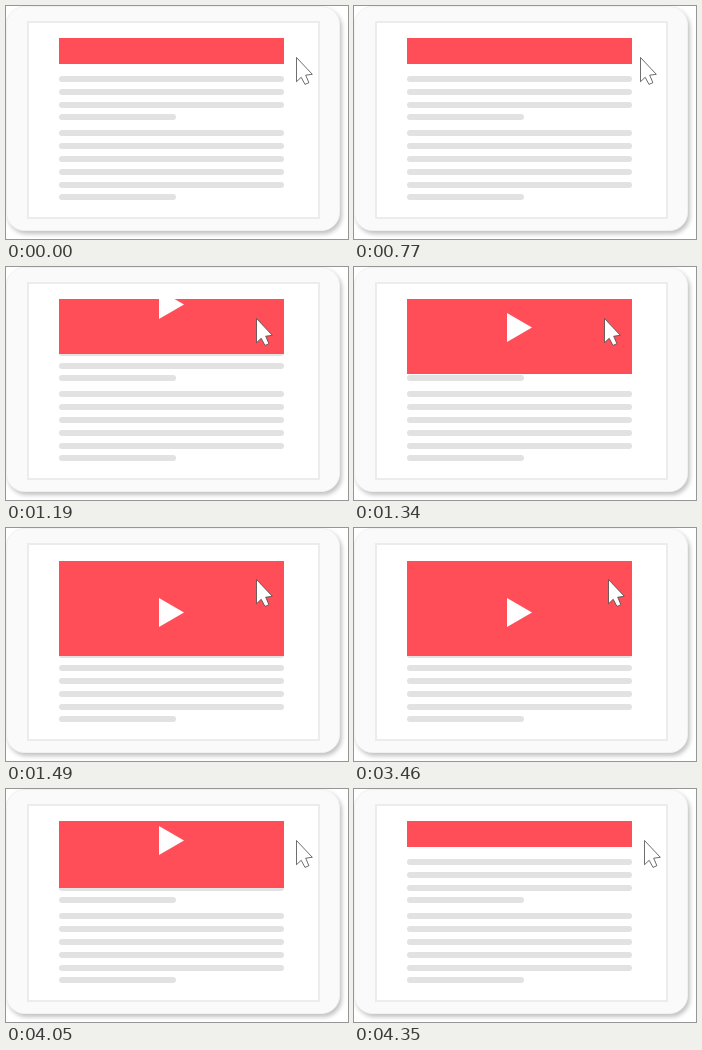
Recreate the animation shown at these times as an HTML page. Size 342x233 px, loop 4.85 s.

```html
<!DOCTYPE html>
<html lang="en">
<head>
<meta charset="utf-8">
<title>Expanding video banner</title>
<style>
  html, body { margin: 0; width: 100%; height: 100%; overflow: hidden; background: #fff; }
  svg { display: block; }
  #device { filter: drop-shadow(2px 3px 2px rgba(0, 0, 0, .24)); }
</style>
</head>
<body>
<svg width="342" height="233" viewBox="0 0 342 233">
  <clipPath id="page"><rect x="53" y="32" width="225" height="170"/></clipPath>
  <rect id="device" x=".5" y=".5" width="333" height="224" rx="18" fill="#fafafa" stroke="#f0f0f0"/>
  <rect x="22" y="16" width="291" height="196" fill="#fff" stroke="#ececec" stroke-width="2"/>
  <g id="lines" fill="#e2e2e2"></g>
  <rect id="banner" x="53" width="225" fill="#ff4e58"/>
  <g clip-path="url(#page)"><path id="play" d="M153 70L178 84.5L153 99Z" fill="#fff"/></g>
  <path id="cursor" d="M.5 .5V24.7L5.2 20.3L9 27.4L12.9 25.7L9.7 18.2L16.3 17.3Z"
    fill="#fff" stroke="#4a4a4a" stroke-width=".8" stroke-linejoin="round"/>
</svg>
<script>
const $ = id => document.getElementById(id);
const LOOP = 4850, STEP = 30;

$('lines').innerHTML = [73, 86, 99, 111, 127, 140, 153, 166, 179, 191].map(y => {
  const width = y === 111 || y === 191 ? 117 : 225;
  return `<rect x="53" y="${y - 3}" width="${width}" height="6" rx="3"/>`;
}).join('');

// Progress 0..1 in `count` equal steps, the first one taken at `start`
const steps = (t, start, count) =>
  Math.min(count, Math.max(0, Math.floor((t - start) / STEP) + 1)) / count;

function draw(t) {
  const move = steps(t, 770, 9) - steps(t, 3460, 9);
  const open = steps(t, 1010, 17) - steps(t, 3870, 17);
  const shift = -80 * (1 - open);
  const top = Math.max(32, Math.round(33 + shift));
  const bottom = Math.round(58 + 70 * open);

  $('banner').setAttribute('y', top);
  $('banner').setAttribute('height', bottom - top);
  $('play').setAttribute('transform', `translate(0 ${Math.round(shift)})`);
  $('cursor').setAttribute('transform', `translate(${Math.round(290 - 40 * move)} 51)`);
}

const begin = performance.now();
function tick() {
  draw((performance.now() - begin) % LOOP);
  requestAnimationFrame(tick);
}
tick();
</script>
</body>
</html>
```
